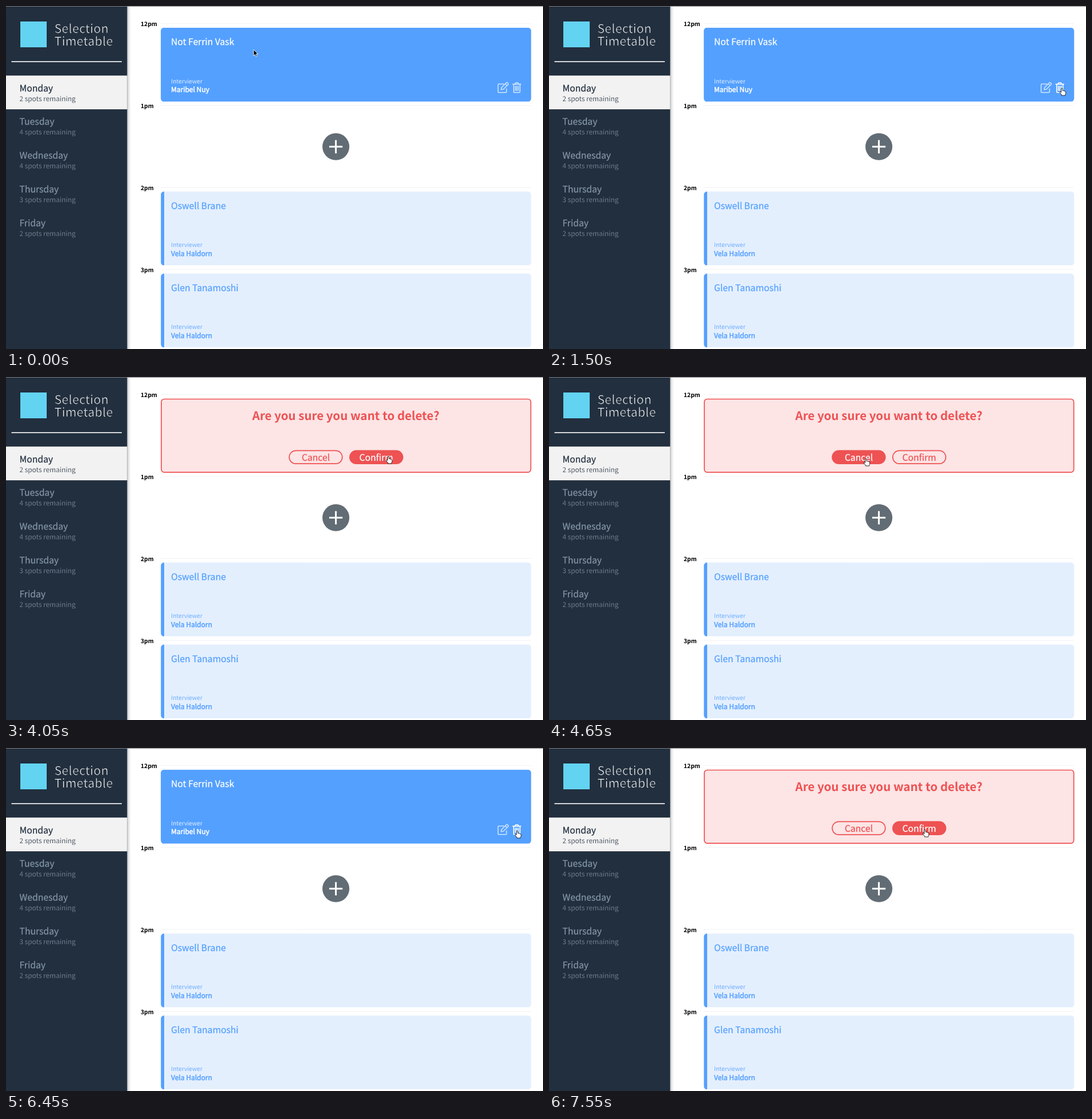
Write an HTML page that moves like this. It is 937 px wide and 598 px high and loops after 8 s.

```html
<!DOCTYPE html>
<html lang="en">
<head>
<meta charset="utf-8">
<title>Timetable</title>
<style>
  html, body { margin: 0; width: 100%; height: 100%; overflow: hidden; background: #fff; }
  svg { display: block; width: 100vw; height: 100vh; }
  text {
    font-family: "Noto Sans CJK JP", "Noto Sans CJK SC", "Noto Sans CJK KR", "Open Sans", sans-serif;
    text-rendering: geometricPrecision;
    white-space: pre;
    fill: currentColor;
  }
</style>
</head>
<body>
<svg id="stage" viewBox="0 0 937 598" preserveAspectRatio="none">
  <defs>
    <linearGradient id="shade">
      <stop offset="0" stop-color="#000" stop-opacity=".22"/>
      <stop offset=".5" stop-color="#000" stop-opacity=".06"/>
      <stop offset="1" stop-color="#000" stop-opacity="0"/>
    </linearGradient>
    <clipPath id="cardClip"><rect x="270.3" width="646" height="129" rx="5.5"/></clipPath>
  </defs>
  <rect width="937" height="598" fill="#fff"/>
  <g id="side"></g>
  <g id="hours"></g>
  <g id="booked"></g>
  <g id="confirm"></g>
  <rect width="937" height="1" fill="#7d7f82"/>
  <g id="cursor">
    <path id="arrow" d="M0 0V10.8L2.5 8.5 4.1 12.3 5.9 11.5 4.3 7.8H7.7Z" fill="#000" stroke="#fff" stroke-width=".9"/>
    <path id="hand" d="M-1.2 1Q0-.7 1.2 1V4.7L2.2 4.5Q3.3 4.4 3.6 5.2 5 4.9 5.3 5.9 6.8 5.7 6.8 7.2V9Q6.6 10.6 5.8 11.5V13H-.6V11.8Q-2.6 9.4-3.6 7.8-4 6-2.4 6.5L-1.2 7.6Z" fill="#fff" stroke="#111" stroke-width=".9" stroke-linejoin="round"/>
  </g>
</svg>
<script>
const NS = 'http://www.w3.org/2000/svg';
const LOOP = 8000;
const BLUE = '#54a0ff', ICE = '#e4effe', RED = '#ee5253', PINK = '#fde4e5';
const SLATE = '#8395a7', NAVY = '#222f3e', PALE = '#f2f2f2';
const $ = id => document.getElementById(id);

function add(parent, tag, attrs) {
  const el = document.createElementNS(NS, tag);
  for (const key in attrs) el.setAttribute(key, attrs[key]);
  return parent.appendChild(el);
}

// In-between weights: an outline in the text colour thickens, one in the backdrop colour thins.
const thick = width => ({ stroke: 'currentColor', 'stroke-width': width });
const thin = (backdrop, width) => ({ stroke: backdrop, 'stroke-width': width });
const medium = thick(.25), semibold = thick(.5);
const bold = { 'font-weight': 700 }, middle = { 'text-anchor': 'middle' };

function label(parent, str, x, y, size, color, look) {
  const el = add(parent, 'text', { x, y, color, 'font-size': size, ...look });
  el.textContent = str;
  return el;
}

const show = (el, on) => el.setAttribute('visibility', on ? 'visible' : 'hidden');

function buildSide() {
  const g = $('side');
  add(g, 'rect', { x: 211.5, width: 7, height: 598, fill: 'url(#shade)' });
  add(g, 'rect', { width: 211.5, height: 598, fill: NAVY });
  add(g, 'rect', { x: 25, y: 27, width: 46, height: 45, fill: '#63d3f2' });
  const heading = { 'letter-spacing': .35, ...thin(NAVY, .65) };
  label(g, 'Selection', 84.5, 47, 21, '#fff', heading);
  label(g, 'Timetable', 84.5, 68.7, 21, '#fff', heading);
  add(g, 'rect', { x: 9.5, y: 96.2, width: 192.5, height: 1.6, fill: '#fff' });
  add(g, 'rect', { y: 121.3, width: 211.5, height: 58.8, fill: PALE });
  const days = [['Monday', 2], ['Tuesday', 4], ['Wednesday', 4], ['Thursday', 3], ['Friday', 2]];
  days.forEach(([day, spots], i) => {
    const y = 148.5 + i * 58.8, color = i ? SLATE : NAVY;
    label(g, day, 23.5, y, 15.7, color, medium);
    label(g, spots + ' spots remaining', 23.5, y + 17, 11.85, color, thin(i ? NAVY : PALE, .22));
  });
}

function buildHours() {
  const g = $('hours');
  ['12pm', '1pm', '2pm', '3pm'].forEach((hour, i) => {
    const y = i * 142.9;
    label(g, hour, 235, 35.3 + y, 10.35, '#000', bold);
    add(g, 'rect', { x: 270, y: 30 + y, width: 646, height: 1, fill: '#f1f2f3' });
  });
  add(g, 'circle', { cx: 575.6, cy: 245.3, r: 23.5, fill: '#626c74' });
  add(g, 'path', { d: 'M564 245.3H587.2M575.6 233.7V256.9', stroke: '#fff', 'stroke-width': 3 });
}

function card(parent, y, name, host, solid) {
  const g = add(parent, 'g', { transform: `translate(0 ${y})` });
  const ink = solid ? '#fff' : BLUE, fill = solid ? BLUE : ICE;
  const box = add(g, 'g', { 'clip-path': 'url(#cardClip)' });
  add(box, 'rect', { x: 270, width: 647, height: 129, fill });
  add(box, 'rect', { x: 270, width: 6, height: 129, fill: BLUE });
  label(g, name, 288, 30.5, 15.7, ink, medium);
  label(g, 'Interviewer', 288, 97.2, 10.25, ink, thin(fill, .15));
  label(g, host, 288, 112.3, 12, ink, semibold);
}

function icon(parent, d) {
  return add(parent, 'path', {
    d, fill: 'none', stroke: '#fff', 'stroke-width': 1.6,
    'stroke-linejoin': 'round', 'stroke-linecap': 'round'
  });
}

function buildBooked() {
  const g = $('booked');
  card(g, 37.8, 'Not Ferrin Vask', 'Maribel Nuy', true);
  return {
    edit: icon(g, 'M868.5 136H860Q858.6 136 858.6 137.4V149.4Q858.6 150.8 860 150.8H872Q873.4 150.8 873.4 149.4V144.5M864 145.8L864.6 142.2 873 133.8Q874 133 875 133.8L876.2 135Q877 136 876.2 137L867.7 145.3ZM871.2 135.8L874.2 138.8'),
    trash: icon(g, 'M884.3 136.4H898.2M888 136.2L889.2 133.8H893.3L894.5 136.2M885.8 136.6V149Q885.8 150.8 887.4 150.8H895.2Q896.8 150.8 896.8 149V136.6M888.7 139.8V147.4M891.3 139.8V147.4M893.9 139.8V147.4')
  };
}

function button(parent, x, str) {
  const box = add(parent, 'rect', {
    x, y: 128.4, width: 92.6, height: 22.8, rx: 11.4, stroke: RED, 'stroke-width': 1.7
  });
  const text = label(parent, str, x + 46.3, 145.9, 15.7, RED, { ...middle, ...medium });
  return on => {
    box.setAttribute('fill', on ? RED : PINK);
    text.setAttribute('color', on ? '#fff' : RED);
  };
}

function buildConfirm() {
  const g = $('confirm');
  add(g, 'rect', {
    x: 271, y: 38.5, width: 644.7, height: 127.6, rx: 5, fill: PINK, stroke: RED, 'stroke-width': 1.7
  });
  label(g, 'Are you sure you want to delete?', 593, 75.3, 20.5, RED, { ...middle, ...bold });
  return { cancel: button(g, 494.2, 'Cancel'), ok: button(g, 599.8, 'Confirm') };
}

buildSide();
buildHours();
card($('hours'), 323.3, 'Oswell Brane', 'Vela Haldorn');
card($('hours'), 466.3, 'Glen Tanamoshi', 'Vela Haldorn');
const icons = buildBooked();
const buttons = buildConfirm();

// Pointer moves: start, end, bend point, destination.
const START = [432, 76];
const MOVES = [
  [0, 850, [660, 60], [853, 106]],
  [850, 1500, [892, 114], [895, 143]],
  [2000, 2650, [770, 82], [695.5, 83.5]],
  [2650, 2850, [672, 86], [669, 137]],
  [2850, 3000, [668, 137], [667, 137]],
  [3600, 3650, [667, 138], [667, 138]],
  [4050, 4650, [612, 143], [553, 142]],
  [5100, 5500, [558, 122], [590, 110]],
  [5600, 6450, [740, 26], [892, 144]],
  [6900, 7550, [770, 92], [656, 142]]
];

function pointer(t) {
  let from = START;
  for (const [a, b, bend, to] of MOVES) {
    if (t < a) break;
    if (t < b) {
      const p = (t - a) / (b - a), k = p * p * (3 - 2 * p), j = 1 - k;
      return from.map((v, i) => j * j * v + 2 * j * k * bend[i] + k * k * to[i]);
    }
    from = to;
  }
  return from;
}

function render(t) {
  const [x, y] = pointer(t);
  const over = (l, top, r, bottom) => x >= l && x <= r && y >= top && y <= bottom;
  const asking = (t >= 1700 && t < 5150) || t >= 6900;
  const edit = !asking && over(858, 133, 877, 151);
  const trash = !asking && over(884, 133, 899, 151);
  const cancel = asking && over(493, 128, 588, 152);
  const ok = asking && over(599, 128, 693, 152);
  const hot = edit || trash || cancel || ok;

  show($('booked'), !asking);
  show($('confirm'), asking);
  icons.edit.setAttribute('opacity', edit ? 1 : .72);
  icons.trash.setAttribute('opacity', trash ? 1 : .72);
  buttons.cancel(cancel);
  buttons.ok(ok);
  show($('arrow'), !hot);
  show($('hand'), hot);
  $('cursor').setAttribute('transform', `translate(${x.toFixed(2)} ${y.toFixed(2)})`);
}

const began = performance.now();
function tick() {
  render((performance.now() - began) % LOOP);
  requestAnimationFrame(tick);
}
tick();
</script>
</body>
</html>
```
